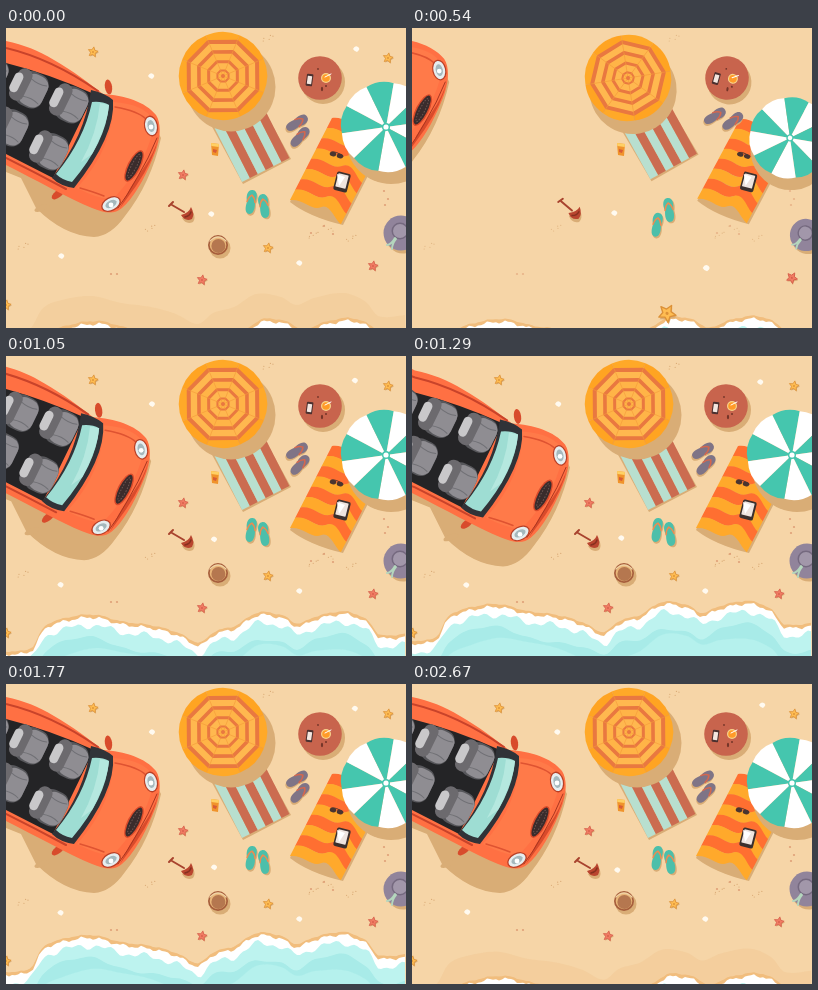
An HTML page that plays this animation: 400 by 300 pixels, repeating every 2.7 s.

```html
<!DOCTYPE html>
<html lang="en">
<head>
<meta charset="utf-8">
<title>Beach</title>
<style>
html, body { margin: 0; height: 100%; overflow: hidden; background: #f6d5a7; }
svg { display: block; width: 100%; height: 100%; }
</style>
</head>
<body>
<svg id="stage" viewBox="0 0 400 300"></svg>
<script>
const LOOP = 2700, TAU = Math.PI * 2;
const SHADOW = '#d9ad76';
const stage = document.getElementById('stage');

// ---- drawing helpers
const path = (d, fill, more = '') => `<path d="${d}" fill="${fill}" ${more}/>`;
const line = (d, color, width = 1) =>
  path(d, 'none', `stroke="${color}" stroke-width="${width}" stroke-linecap="round"`);
const oval = (x, y, rx, ry, fill, turn = 0, more = '') =>
  `<ellipse rx="${rx}" ry="${ry}" fill="${fill}" transform="translate(${x} ${y}) rotate(${turn})" ${more}/>`;
const disc = (x, y, r, fill) => oval(x, y, r, r, fill);
const box = (x, y, w, h, r, fill, turn = 0) =>
  `<rect x="${-w / 2}" y="${-h / 2}" width="${w}" height="${h}" rx="${r}" fill="${fill}" transform="translate(${x} ${y}) rotate(${turn})"/>`;
const polar = (r, deg) => {
  const a = deg * TAU / 360;
  return (r * Math.cos(a)).toFixed(2) + ' ' + (r * Math.sin(a)).toFixed(2);
};
const polygon = (n, r, offset = 0) =>
  'M' + Array.from({ length: n }, (_, i) => polar(r, offset + i * 360 / n)).join('L') + 'Z';
const wedge = (r, from, to) =>
  `M0 0L${polar(r, from)}Q${polar(r * 1.09, (from + to) / 2)} ${polar(r, to)}Z`;
const repeat = (n, draw) => Array.from({ length: n }, (_, i) => draw(i)).join('');

// ---- things on the sand, each drawn around its own centre
function goldUmbrella() {
  const rim = repeat(8, i => path(wedge(44, i * 45 + 22, i * 45 + 67), i % 2 ? '#ffa928' : '#ffa422'));
  const rings = [[37, 4], [26, 3.6], [15.5, 3], [6, 2]].map(([r, w], i) =>
    path(polygon(8, r, 22), i % 2 ? '#ffb447' : '#ffb84f',
      `stroke="#e97840" stroke-width="${w}" stroke-linejoin="round"`)).join('');
  const ribs = repeat(8, i => line(`M0 0L${polar(43, i * 45 + 22)}`, '#f3993a', .6));
  return disc(8, 11, 44.5, SHADOW) + rim + rings + ribs + disc(0, 0, 2, '#e97840');
}

function tealUmbrella() {
  return disc(5, 12, 45, SHADOW) +
    repeat(10, i => path(wedge(44.5, 172 + i * 36, 208 + i * 36), i % 2 ? '#fff' : '#45c6ae')) +
    disc(0, 0, 4, '#45c6ae') + disc(0, 0, 2.6, '#fff');
}

function stripedTowel() {
  const stripe = i => {
    const x = -39 + i * 7.9, y = -20 - i * 4;
    return path(`M${x} ${y}l7.9 -4l31 61l-7.9 4Z`, i % 2 ? '#cb6c50' : '#b8dfcf');
  };
  return path('M-40 -18L8 -42L41 18L-7 43Z', SHADOW) + repeat(6, stripe);
}

function wavyTowel() {
  const stripe = i => {
    const x = 1 - i * 5.25, y = -53 + i * 10.25;
    return path(`M${x} ${y}c14 -2 20 11 31 7s14 11 20 17l-5.4 10.4c-7 -6 -11 -21 -20 -17s-18 -9 -31 -7Z`,
      i % 2 ? '#ffa92b' : '#ff6f31');
  };
  return path('M0 -49L52 -25L12 54Q-22 46 -41 31Z', SHADOW) + repeat(8, stripe) +
    line('M1 -19q4 -1 11 4', '#54392e', 1) +
    oval(2, -17, 3.3, 2.3, '#4a3530', 15) + oval(9, -15, 3.3, 2.3, '#4a3530', 15) +
    box(11, 11, 14, 19, 2, '#3b302e', 14) + box(11, 10, 10.5, 13.5, .5, '#eee4df', 14) +
    path('M6 3L14 6L8 15Z', '#fff');
}

const table = () =>
  disc(3, 4, 22, SHADOW) + disc(0, 0, 21.8, '#c8644d') +
  box(-10.5, 2, 6.5, 12, 1, '#4b302f', 8) + box(-10.5, 2, 4.4, 8, .3, '#f3e6df', 8) +
  disc(6, 0, 5, '#f8d48b') + disc(6, 0, 3.8, '#ff9b28') + line('M5 -1l6 -3', '#fff', 1) +
  oval(2, 11, 1.1, 2.3, '#743529') + disc(-2, -9, .9, '#743529') + disc(6, 8, 1, '#743529');

function sandal(sole, strap, turn) {
  const d = 'M0 -12C6 -12 5.5 -4 4 0C5 6 4 12 0 12C-5 12 -5 6 -4 0C-6 -5 -5 -12 0 -12Z';
  return `<g transform="rotate(${turn})">` + path(d, SHADOW, 'transform="translate(1.2 1.6)"') +
    path(d, sole) + line('M-4 0Q-3 -5 0 -7Q3 -5 4 0', strap, 1.5) + '</g>';
}

const hat = () =>
  disc(2, 3, 17.5, SHADOW) + disc(0, 0, 17.5, '#91849b') + disc(-1, -2, 8.5, '#75697f') +
  disc(-1, -2, 7, '#a297aa') + line('M-6 5Q-10 12 -14 12M-5 6Q-9 11 -9 16', '#b4d6bd', 2);

const bucket = () =>
  disc(2, 3, 10.5, SHADOW) + disc(0, 0, 10, '#a65e3c') + disc(0, 0, 8.3, '#e9b679') +
  disc(.4, 1, 7, '#b5774f') + line('M-8 -4Q0 -12 8 -4', '#f0d3a4', 1.3);

const cup = () =>
  path('M-4 -6L4 -5L3 7L-3 6Z', '#f0932b') + path('M-4 -6L4 -5L3.7 -2L-3.7 -3Z', '#ffd064') +
  path('M-2 0l4 1l-1 3l-3 -1Z', '#d95c35');

const shovel = () =>
  path('M0 5Q9 3 11 -1Q14 5 11 9Q4 12 0 5Z', SHADOW, 'transform="translate(1 2)"') +
  line('M-9 -6L3 1M-12 -5L-8 -9', '#a8432e', 2) +
  path('M0 4Q8 2 10 -4Q14 3 11 8Q4 11 0 4Z', '#b9452f') + line('M4 6Q9 5 10 1', '#87301f', 1.5);

function star(fill, edge) {
  const d = 'M' + Array.from({ length: 10 }, (_, i) => polar(i % 2 ? 2.5 : 5.2, i * 36 - 80)).join('L') + 'Z';
  return path(d, SHADOW, 'transform="translate(.8 1)"') +
    path(d, fill, `stroke="${edge}" stroke-width=".8" stroke-linejoin="round"`) + disc(0, 0, .9, edge);
}
const goldStar = () => star('#ffbd52', '#dc9138');
const redStar = () => star('#f17c63', '#d65f4c');
const shell = () => path('M-3 0Q-1 -4 2 -2Q5 0 1 3Q-2 2 -3 0Z', '#fffaf0');

function speckles() {
  const clumps = [[17, 218], [144, 200], [262, 10], [307, 207], [322, 200], [345, 210]];
  const grains = clumps.map(([x, y]) => repeat(5, i =>
    disc(x + 5 * Math.sin(i * 2.4 + x), y + 3 * Math.cos(i * 3.7), .6, '#d9a974'))).join('');
  const pebbles = [[105, 246], [111, 246], [378, 163], [382, 171], [379, 177], [305, 205], [318, 198], [327, 206]];
  return grains + pebbles.map(([x, y]) => disc(x, y, 1.1, '#dfa078')).join('');
}

function seat(x, y) {
  return `<g transform="translate(${x} ${y}) rotate(26)">` +
    box(4, 0, 29, 36, 11, '#57575b') + box(6, 0, 25, 33, 10, '#8f8d92') +
    line('M-2 -10Q8 -7 16 -10M-2 10Q8 7 16 10', '#707075', 1) +
    box(-8, 0, 15, 34, 7, '#6c6a6e') + box(-13, 0, 9, 21, 4.5, '#c9c8ca') + '</g>';
}

function car() {
  const lamp = (x, y, turn) => oval(x, y, 7, 10.5, '#b83f26', turn) + oval(x, y, 5.8, 9.2, '#e6edef', turn) +
    oval(x, y, 3.5, 6, '#a5b8bd', turn) + disc(x, y + 1, 2.4, '#fff');
  return path('M-40 128L15 150L30 180Q58 208 88 209Q105 208 119 188Q145 155 155 110L140 80Z', SHADOW) +
    oval(36, 180, 8, 3, SHADOW, -20) +
    oval(102.5, 59, 3.6, 7.5, '#d84b2c', -8) + oval(52, 166, 7.5, 3.5, '#d84b2c', -38) +
    path('M-40 -6L0 13C18 17 32 22 48 32C66 42 84 56 97 66C118 67 140 74 150 87C157 98 153 117 147 130C138 152 126 172 116 180C108 187 98 185 86 180C62 170 30 152 0 137L-40 118Z', '#ff7043') +
    path('M107 74Q139 76 148 93Q145 130 108 170Q96 173 71 160Q108 119 107 74Z', '#ff7a49') +
    line('M-40 6L0 20Q46 31 92 63M-40 114L0 130Q30 145 60 161', '#c9432a', 2) +
    path('M-40 16L0 35Q44 46 88 66L47 150L0 126L-40 108Z', '#242426') +
    seat(-18, 45) + seat(22, 60) + seat(62, 75) + seat(2, 98) + seat(42, 122) + seat(-38, 82) +
    path('M85 62Q99 65 107 72Q110 107 68 160Q54 158 46 150Q79 108 85 62Z', '#303338') +
    path('M86 74Q96 73 103 77Q100 114 66 154Q56 152 50 146Q78 112 86 74Z', '#9eddd3') +
    path('M94 75L103 77Q101 98 86 126L75 134Q91 106 94 75Z', '#b5e8df') +
    line('M109 79Q132 83 140 91M74 160Q88 164 98 168', '#df5331', 1.5) +
    path('M153 108Q148 132 130 158L114 180Q124 158 137 141Q148 126 153 108Z', '#d94b2b') +
    line('M151 110Q143 130 131 150Q121 168 112 180', '#a93620', 1) +
    oval(128, 138, 6.5, 17.5, '#d94b2b', 27) + oval(128, 138, 5, 16, '#3a2c2c', 27) +
    oval(128, 138, 2.5, 13, 'none', 27, 'stroke="#6d5753" stroke-width="1" stroke-dasharray="1.5 1.5"') +
    lamp(145, 98, -12) + lamp(105, 176, 62);
}

// ---- entrances: art, home, offset [x, y, turn, scale] at MEET, start offset, start time
const MEET = 540, SETTLE = 320;
const entrances = [
  [stripedTowel(), 244, 113, [1, -3, -2, 1], [0, -175], 90],
  [goldUmbrella(), 217, 48, [-1, 2, 14, .98], [0, -112], 120],
  [table(), 314, 50, [1, 0, 8, 1], [30, -90], 150],
  [wavyTowel(), 325, 143, [1, 0, 1, .98], [130, -60], 90],
  [tealUmbrella(), 380, 99, [-2, 11, 18, .9], [110, -40], 150],
  [sandal('#7f7486', '#d4674e', 58), 291, 95, [12, -7, 0, 1], [130, -20], 200],
  [sandal('#7f7486', '#d4674e', 42), 294, 109, [27, -16, 10, 1], [130, -20], 220],
  [sandal('#4cbfaa', '#ec8b51', 8), 245, 174, [0, 23, 0, 1], [0, 145], 200],
  [sandal('#4cbfaa', '#ec8b51', -10), 258, 178, [-1, 4, 2, 1], [0, 145], 180],
  [cup(), 209, 121, [0, 0, 0, 1], [0, -140], 180],
  [hat(), 395, 205, [-1, 2, 6, .92], [40, 0], 200],
  [shovel(), 175, 183, [-18, -2, 10, 1], [-210, 0], 260],
  [goldStar(), 262, 220, [-7, 66, 20, 1.75], [-10, 100], 420],
  [redStar(), 367, 238, [13, 12, 20, 1.1], [50, 80], 320],
  [shell(), 205, 186, [-3, -1, 0, 1], [0, 130], 250, [4, -4]],
  [shell(), 293, 235, [1, 5, 0, 1.1], [10, 80], 300, [0, 0]],
  [shell(), 55, 228, null, [-70, 10], MEET, [-1, 1]],
  [shell(), 145, 48, null, [-50, -65], MEET, [1, 0]],
  [shell(), 350, 21, null, [0, -40], MEET, [-2, 5]],
  [bucket(), 212, 217, null, [-5, 100], MEET],
  [goldStar(), 87, 24, null, [-20, -45, -60, 1.5], MEET],
  [goldStar(), 382, 30, null, [30, -45, 60, 1.5], MEET],
  [goldStar(), 0, 277, null, [-15, 20], MEET],
  [redStar(), 177, 147, null, [-190, 0, -90, 1.3], MEET],
  [redStar(), 196, 252, null, [-20, 60, 60, 1.5], MEET]
];

stage.innerHTML = `<rect width="400" height="300" fill="#f6d5a7"/>
  <path id="wet" fill="#eec28c"/><path id="edge" fill="#f1bd7d"/><path id="foam" fill="#fff"/>
  <path id="shallow" fill="#bdf3ef"/><path id="middle" fill="#a8ebe8"/><path id="deep" fill="#b5f1ed"/>
  <g id="grains">${speckles()}</g>
  ${entrances.map(e => `<g class="thing">${e[0]}</g>`).join('')}
  <g id="car">${car()}</g>`;
const part = id => document.getElementById(id);
const things = document.querySelectorAll('.thing');

// ---- motion
const clamp = v => Math.max(0, Math.min(1, v));
const easeOut = p => 1 - (1 - clamp(p)) ** 3;

// Smooth curve through [position, value] pairs
function track(keys, at) {
  const last = keys.length - 1;
  if (at <= keys[0][0]) return keys[0][1];
  if (at >= keys[last][0]) return keys[last][1];
  const i = keys.findIndex(k => k[0] > at) - 1;
  const slope = j => {
    const a = keys[Math.max(0, j - 1)], b = keys[Math.min(last, j + 1)];
    return (b[1] - a[1]) / (b[0] - a[0]);
  };
  const [x0, y0] = keys[i], [x1, y1] = keys[i + 1], w = x1 - x0, p = (at - x0) / w, q = 1 - p;
  return y0 * (1 + 2 * p) * q * q + slope(i) * w * p * q * q +
    y1 * p * p * (3 - 2 * p) - slope(i + 1) * w * p * p * q;
}

const crest = [[-20, 290], [0, 288], [24, 284], [36, 264], [52, 256], [85, 251], [115, 258], [145, 262],
  [170, 269], [192, 279], [207, 268], [228, 262], [250, 249], [275, 252], [290, 260], [308, 253],
  [338, 248], [360, 257], [372, 271], [400, 270], [420, 268]];
const tide = [[30, 62], [300, 56], [540, 43], [840, 22], [1290, 0], [1480, -1], [1770, 3], [2190, 26], [2700, 45]];
const wetline = [[1480, -4], [1770, 1], [2190, 11], [2700, 17]];
const drive = [[100, -270], [300, -190], [540, -118], [840, -51], [1080, -6], [1290, 3], [1770, 0], [2700, 0]];
const drift = [[840, .3], [1290, 1], [1770, .7], [2190, .25], [2700, 0]];

function shore(rise, depth, shift = 0) {
  let d = 'M0 400';
  for (let x = 0; x <= 400; x += 3)
    d += `L${x} ${(track(crest, x - shift) + rise + depth(x)).toFixed(1)}`;
  return d + 'L400 400Z';
}

function pose([, x, y, mid, from, start, sway], t) {
  const pad = o => [o[0], o[1], o[2] || 0, o[3] || 1];
  const a = pad(from), b = pad(mid || from), rest = [0, 0, 0, 1];
  const mix = (u, v, p) => u.map((n, i) => n + (v[i] - n) * p);
  const o = t < MEET
    ? mix(a, b, easeOut((t - start) / Math.max(1, MEET - start)))
    : mix(b, rest, easeOut((t - MEET) / SETTLE));
  const s = sway && t >= MEET ? track(drift, t) * clamp((t - MEET) / 300) : 0;
  if (s) { o[0] += sway[0] * s; o[1] += sway[1] * s; }
  return `translate(${x + o[0]} ${y + o[1]}) rotate(${o[2]}) scale(${o[3]})`;
}

function draw(now) {
  let t = now % LOOP;
  if (t < 30) t = LOOP; // the loop opens on its finished picture
  entrances.forEach((e, i) => {
    things[i].setAttribute('visibility', t < e[5] ? 'hidden' : 'visible');
    things[i].setAttribute('transform', pose(e, t));
  });
  const d = track(drive, t);
  part('car').setAttribute('transform', `translate(${d} ${d * .475})`);
  part('grains').setAttribute('opacity', clamp((t - 250) / 450));

  const rise = track(tide, t), shift = rise * .16;
  const ripple = x => 1.2 * Math.sin(x * .31) + .8 * Math.sin(x * .73);
  const layer = (id, depth) => part(id).setAttribute('d', shore(rise, depth, shift));
  part('wet').setAttribute('d', shore(track(wetline, t), () => 0));
  part('wet').setAttribute('opacity', t < 1480 ? 0 : .55 - .2 * clamp((t - 1480) / 1200));
  layer('edge', x => -3 + ripple(x) * .4);
  layer('foam', ripple);
  layer('shallow', x => 8 + 2.2 * Math.sin(x * .17) + 1.7 * Math.sin(x * .39 + 1));
  layer('middle', x => 22 + 3 * Math.sin(x * .05 + 1) + Math.sin(x * .2));
  layer('deep', x => 32 + 4 * Math.sin(x * .04));
  requestAnimationFrame(draw);
}
requestAnimationFrame(draw);
</script>
</body>
</html>
```
